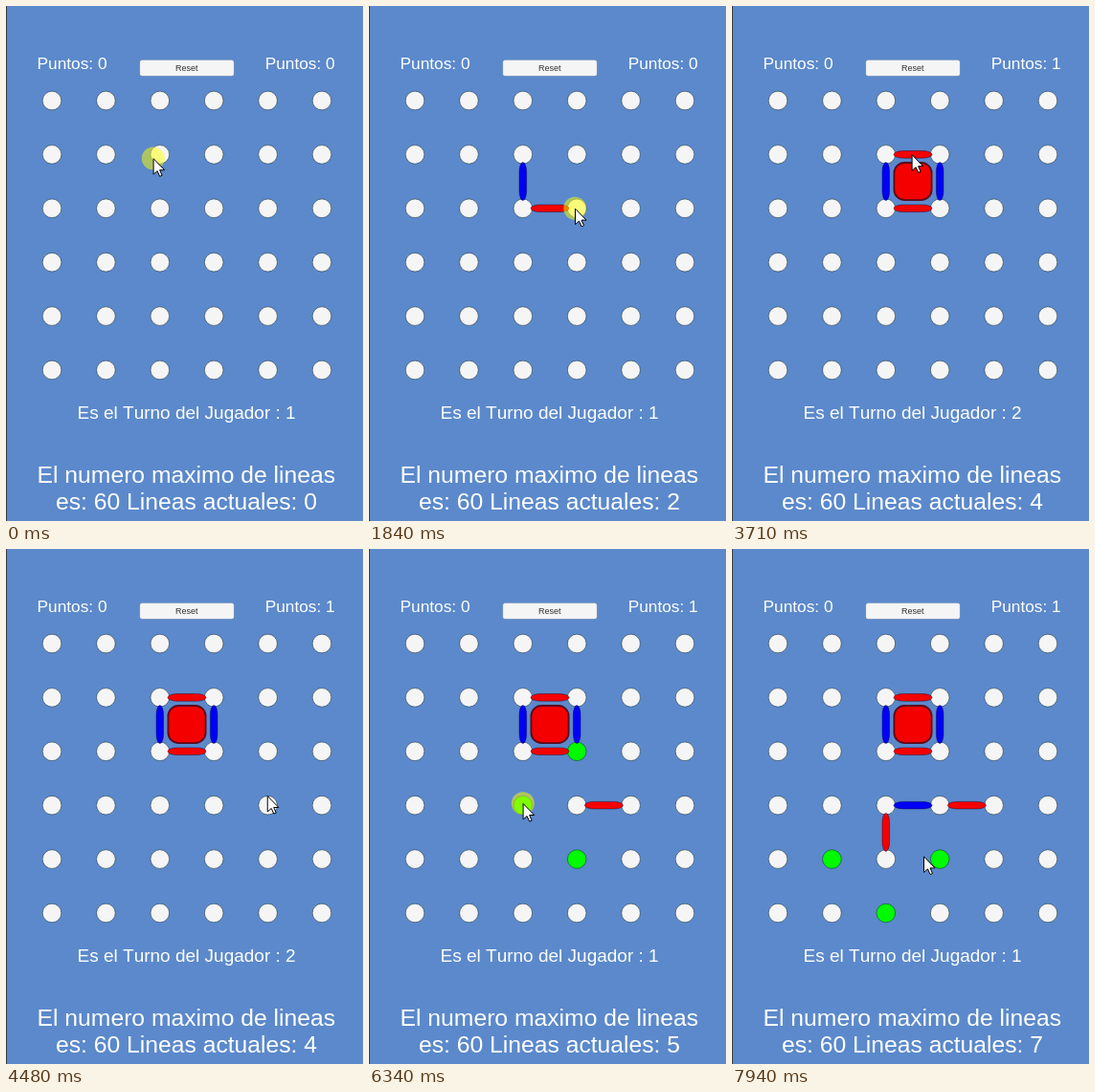
Recreate the animation shown at these times as an HTML page with a canvas. Size 373 px wide and 539 px high, loop 8000 ms.

```html
<!DOCTYPE html>
<html lang="es">
<head>
<meta charset="utf-8">
<title>Puntos y lineas</title>
<style>
html, body { margin: 0; width: 100%; height: 100%; overflow: hidden; background: #5b89cb; }
canvas { display: block; }
</style>
</head>
<body>
<canvas id="stage" width="373" height="539"></canvas>
<script>
const ctx = document.getElementById('stage').getContext('2d');
const LOOP = 8000, STEP = 56.4, SIZE = 6, PRESS = 140, DELAY = 70;
const px = c => 48 + c * STEP;
const py = r => 99 + r * STEP;
const COLORS = ['#0000f5', '#f50000'];

// Mouse stops: dot, offset from it, click that ends a line there (join),
// click that starts the next one (pick). Stops without clicks have at / go.
const stops = [
  { dot: [2, 1], off: [-7, 4], pick: 0 },
  { dot: [2, 2], off: [-1, -1], join: 560, pick: 920 },
  { dot: [3, 2], off: [-2, 0], join: 1540, pick: 1840 },
  { dot: [3, 1], off: [-1, 0], join: 2230, pick: 2530 },
  { dot: [2, 1], off: [7, 0], join: 3220, go: 3709 },
  { dot: [2, 1], off: [27, 0], at: 3710, go: 3710 },
  { dot: [4, 3], off: [1, -8], pick: 4700, at: 4550 },
  { dot: [3, 3], off: [-9, 2], join: 5250, pick: 5870 },
  { dot: [2, 3], off: [0, -2], join: 6340, pick: 6710 },
  { dot: [2, 4], off: [-1, 0], join: 7250, pick: 7640 },
  { dot: [3, 4], off: [-17, -3], at: 7940 }
].map(s => ({
  x: px(s.dot[0]) + s.off[0],
  y: py(s.dot[1]) + s.off[1],
  at: s.join - 20 || 0,
  go: s.pick + PRESS || LOOP,
  ...s
}));

// Each pick followed by a join draws one line
const lines = stops.flatMap((s, i) => 'pick' in s ? [{
  from: s.dot, to: stops[i + 1].dot,
  pick: s.pick + DELAY / 2, drawn: stops[i + 1].join + DELAY || Infinity
}] : []);

const same = (a, b) => a[0] === b[0] && a[1] === b[1];
const ease = k => k * k * (3 - 2 * k);
const pressed = t => stops.some(s =>
  [s.join, s.pick].some(click => t >= click && t < click + PRESS));

function mouseAt(t) {
  const i = stops.findLastIndex(s => t >= s.at);
  const a = stops[i], b = stops[i + 1];
  if (!b || t <= a.go) return [a.x, a.y];
  const k = ease((t - a.go) / (b.at - a.go));
  return [a.x + (b.x - a.x) * k, a.y + (b.y - a.y) * k];
}

function text(str, x, y, size, color = '#fff') {
  ctx.font = `${size}px "Liberation Sans", Arial, sans-serif`;
  ctx.fillStyle = color;
  ctx.fillText(str, x, y);
}

function shape(fill, stroke, width) {
  ctx.fillStyle = fill;
  ctx.fill();
  if (!stroke) return;
  ctx.strokeStyle = stroke;
  ctx.lineWidth = width;
  ctx.stroke();
}

function circle(x, y, r, ...paint) {
  ctx.beginPath();
  ctx.arc(x, y, r, 0, 7);
  shape(...paint);
}

function panel(x, y, w, h, r, ...paint) {
  ctx.beginPath();
  ctx.roundRect(x, y, w, h, r);
  shape(...paint);
}

function line({ from, to }, color) {
  ctx.save();
  ctx.translate((px(from[0]) + px(to[0])) / 2, (py(from[1]) + py(to[1])) / 2);
  if (from[0] === to[0]) ctx.rotate(Math.PI / 2);
  panel(-20, -3.8, 40, 7.6, { x: 10, y: 3.8 }, color, 'rgba(0,0,40,.5)', 0.8);
  ctx.restore();
}

function arrow(x, y) {
  const pts = [[0, 0], [0, 16.5], [4, 13], [6.6, 18.7], [9, 17.6], [6.5, 12], [11.6, 12]];
  ctx.beginPath();
  pts.forEach(([dx, dy]) => ctx.lineTo(x + dx, y + dy));
  ctx.closePath();
  shape('#fff', '#000', 1);
}

function draw(t) {
  const done = lines.filter(l => t >= l.drawn);
  const active = lines.find(l => t >= l.pick && t < l.drawn);
  const linked = (a, b) => done.some(l =>
    same(l.from, a) && same(l.to, b) || same(l.from, b) && same(l.to, a));
  const points = [0, 0];
  let player = 0;

  ctx.fillStyle = '#5b89cb';
  ctx.fillRect(0, 0, 373, 539);
  ctx.fillStyle = '#333940';
  ctx.fillRect(0, 0, 1, 539);

  for (let r = 0; r < SIZE; r++) {
    for (let c = 0; c < SIZE; c++) {
      const free = active && !linked([c, r], active.from) &&
        Math.hypot(c - active.from[0], r - active.from[1]) === 1;
      circle(px(c), py(r), 9.8, free ? '#00fa00' : '#f5f5f5', 'rgba(10,30,30,.65)', 0.7);
    }
  }

  done.forEach((l, i) => {
    line(l, COLORS[player]);
    const start = done[i - 3]?.from;
    if (start && same(start, l.to)) {
      // four lines in a row closed a square: score and play again
      points[player]++;
      panel(px(start[0]) + 8.6, py(start[1]) + 8.6, 39.2, 39.2, 11, COLORS[player], '#5a0a1c', 1.8);
    } else {
      player = 1 - player;
    }
  });

  panel(139.8, 56.5, 98.4, 16.8, 2.5, '#f5f5f5', 'rgba(60,70,90,.35)', 0.5);
  ctx.fontKerning = 'none';
  ctx.textAlign = 'center';
  text('Reset', 188.7, 68, 9, '#323232');
  text('Puntos: ' + points[0], 69, 66, 17.3);
  text('Puntos: ' + points[1], 307.2, 66, 17.3);
  text('Es el Turno del Jugador : ' + (player + 1), 188.6, 432, 19);
  text('El numero maximo de lineas', 188.3, 499.2, 24.7);
  text('es: 60 Lineas actuales: ' + done.length, 188.5, 527.2, 24.7);

  const [x, y] = mouseAt(t);
  if (pressed(t)) circle(x, y, 12, 'rgba(255,255,0,.5)');
  arrow(x + 0.3, y + 0.3);
}

const start = performance.now();
function tick() {
  draw((performance.now() - start) % LOOP);
  requestAnimationFrame(tick);
}
tick();
</script>
</body>
</html>
```
